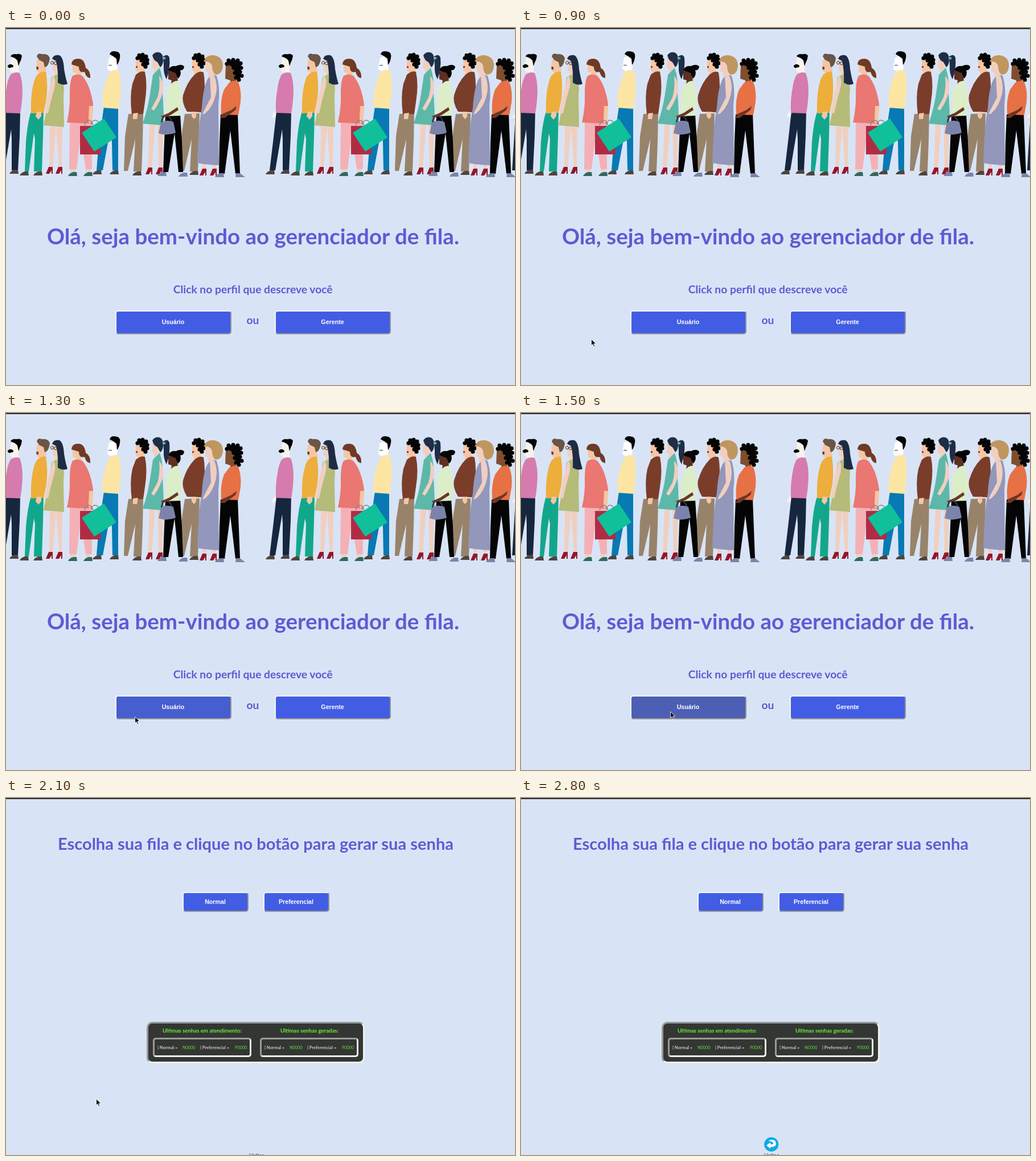
Animation of 894x627 px, one loop 8000 ms. Source, as an HTML page with a canvas:

```html
<!DOCTYPE html>
<html lang="pt">
<head>
<meta charset="utf-8">
<style>
html, body { margin: 0; width: 100%; height: 100%; overflow: hidden; background: #d8e4f6; }
#stage { position: relative; width: 894px; height: 627px; overflow: hidden; background: #d8e4f6; }
#bar { position: absolute; width: 894px; height: 2px; background: #2d2d2f; }
.page, .page > svg, canvas { position: absolute; left: 0; top: 0; width: 894px; height: 627px; }
[hidden] { display: none; }
.box { position: absolute; box-sizing: border-box; border: 2px solid; border-color: #f1f2f3 #949598 #949598 #f1f2f3;
  border-radius: 5px; background: #425de4; }
.sunk { background: #343634; border: 3.5px solid; border-color: #999b99 #eeefee #eeefee #999b99; border-radius: 10px; }
.inner { border-radius: 5px; }
text { font-family: Lato, "Noto Sans", sans-serif; font-weight: 700; fill: #6159d3; }
.mid { text-anchor: middle; }
.btn { font: 700 10.67px "Liberation Sans", Arial, sans-serif; fill: #fff; text-anchor: middle; }
.head { font-size: 9.6px; fill: #66ee34; text-anchor: middle; }
.label { font-size: 7.7px; fill: #c9cbc9; }
.code { font-size: 7.3px; font-weight: 400; fill: #5fdc32; }
.link { font-size: 9.7px; font-weight: 400; fill: #4b2aa0; text-anchor: middle; }
#cursor { position: absolute; left: 0; top: 0; overflow: visible; }
</style>
</head>
<body>
<div id="stage">
  <div class="page" id="welcome">
    <canvas id="crowd" width="894" height="627"></canvas>
    <div class="box" id="user" style="left:192px;top:496px;width:204px;height:42px"></div>
    <div class="box" style="left:472px;top:496px;width:204px;height:42px"></div>
    <svg viewBox="0 0 894 627">
      <text class="mid" x="434" y="380" font-size="38.5">Olá, seja bem-vindo ao gerenciador de fila.</text>
      <text class="mid" x="433.7" y="465.5" font-size="19.25">Click no perfil que descreve você</text>
      <text class="mid" x="433.5" y="519.5" font-size="19.25">ou</text>
      <text class="btn" x="293.5" y="519.5">Usuário</text>
      <text class="btn" x="573.5" y="519.5">Gerente</text>
    </svg>
  </div>
  <div class="page" id="queue" hidden>
    <div class="box" style="left:310px;top:165px;width:116px;height:35px"></div>
    <div class="box" style="left:452px;top:165px;width:116px;height:35px"></div>
    <div class="box sunk" style="left:247px;top:393px;width:383px;height:73px"></div>
    <div class="box sunk inner" style="left:258px;top:421px;width:173px;height:34px"></div>
    <div class="box sunk inner" style="left:446px;top:421px;width:173px;height:34px"></div>
    <svg viewBox="0 0 894 627">
      <text class="mid" x="438.5" y="91" font-size="29.05">Escolha sua fila e clique no botão para gerar sua senha</text>
      <text class="btn" x="367.5" y="185.5">Normal</text>
      <text class="btn" x="509.5" y="185.5">Preferencial</text>
      <text class="head" x="344.5" y="411.7">Ultimas senhas em atendimento:</text>
      <text class="head" x="533" y="411.7">Ultimas senhas geradas:</text>
      <g id="counters">
        <text class="label" x="266" y="441">| Normal =</text>
        <text class="code" x="310" y="441">N0000</text>
        <text class="label" x="341" y="441">| Preferencial =</text>
        <text class="code" x="402" y="441">P0000</text>
      </g>
      <use href="#counters" x="188"/>
      <text class="link" x="440" y="630.8">Voltar</text>
      <g id="back">
        <circle cx="439.7" cy="608.3" r="12.6" fill="#12a9e3"/>
        <path d="M434 602Q447 597 448 607Q448 613 438 613V616L431 610L438 605V608Q443 609 443 606Q442 603 434 602Z" fill="#fff"/>
      </g>
    </svg>
  </div>
  <div id="bar"></div>
  <svg id="cursor" width="10" height="15" hidden>
    <path d="M0.5 0.5V11.6L3 9.4L4.9 13.4L6.7 12.6L4.9 8.7L8.6 8.4Z" fill="#111" stroke="#fff" stroke-width=".8"/>
  </svg>
</div>
<script>
const $ = id => document.getElementById(id);
const ctx = $('crowd').getContext('2d');

const skin = '#f4c6a5', pale = '#f0cfc0', cream = '#f7f3ec', navy = '#16263f', black = '#050505';
const brown = '#7a3d2a', tan = '#98836a', slate = '#7c83ab', dark = '#6b3626', sole = '#4f443e';

function fill(color, d) {
  ctx.fillStyle = color;
  ctx.fill(new Path2D(d));
}
function line(color, width, d) {
  ctx.strokeStyle = color;
  ctx.lineWidth = width;
  ctx.stroke(new Path2D(d));
}
function at(dx, draw) {
  ctx.save();
  ctx.translate(dx, 0);
  draw();
  ctx.restore();
}
// Solid hair with a wavy outline
function curls(r, ...points) {
  ctx.fillStyle = ctx.strokeStyle = black;
  ctx.lineJoin = ctx.lineCap = 'round';
  const hair = new Path2D();
  points.forEach(([x, y]) => hair.lineTo(x, y));
  ctx.fill(hair);
  for (const [x, y] of points) {
    ctx.beginPath();
    ctx.arc(x, y, r, 0, 7);
    ctx.fill();
  }
}
const shoe = (color, x, y) => fill(color, `M${x} ${y}q2-5 9-7h6l1 7z`);
const boots = (y, ...xs) => xs.forEach(x => fill('#96152a', `M${x} ${y}l5-12h7v12h-2v-6l-4 6z`));

function shortCurls() {
  fill(skin, 'M228 57L242 54L243 70L244 78L231 83L232 77L228 75Z');
  curls(3.6, [231, 53], [234, 48], [240, 47], [246, 50], [248, 56], [248, 62], [245, 68], [241, 64], [238, 57]);
  fill('#b22b2b', 'M228 67h3v3h-3z');
}
function tanTrousers() {
  fill(tan, 'M215 151L241 150L240 200L238 252L224 252L227 195L214 251L207 251L209 190Z');
}

const people = [
  function mustacheMan() {
    fill(cream, 'M9 53L20 51L24 58L22 74L24 80L14 84L14 78Q7 78 6 70Z');
    fill(black, 'M8 50Q10 45 18 46Q26 44 28 49Q27 56 24 61L22 67L20 57Q16 52 8 50Z');
    fill(black, 'M3 66Q8 61 13 66Q13 70 9 69Q6 72 3 68Z');
    fill(cream, 'M-3 145L4 145L-1 154L-8 158L-8 152Z');
    fill(navy, 'M-1 147L25 147L24 190L21 250L10 250L10 195L9 178L-3 250L-13 250L-7 200Z');
    fill('#d67bae', 'M8 82Q16 76 24 79Q29 92 29 112Q28 135 25 150L-2 149Q-3 125 1 105Q3 90 8 82Z');
    shoe(sole, -20, 257);
    shoe(sole, 6, 256);
  },
  function amberMan() {
    fill(skin, 'M54 56L68 53L70 68L71 80L57 84L58 77Q53 77 53 71Z');
    fill('#6a5546', 'M54 50Q56 43 63 46Q74 44 77 53Q76 62 72 67L68 69L66 60L58 56Z');
    fill(brown, 'M53 68H57V73H54Z');
    fill('#12a78c', 'M44 147L66 146L65 190L63 252L49 252L51 195L49 185L40 252L33 252L35 200Q38 165 44 147Z');
    fill('#eeae3b', 'M55 82Q63 75 70 77Q74 100 71 125L66 149L44 150Q43 115 49 95Q51 86 55 82Z');
    fill(skin, 'M54 147L62 147L62 155L57 161L52 155Z');
    shoe(sole, 24, 259);
    shoe(sole, 48, 259);
  },
  function oliveWoman() {
    fill(pale, 'M77 172L88 174L82 246L76 246ZM88 174L99 174L98 246L93 246Z');
    fill(pale, 'M81 54L91 52L94 66L96 82L86 85L86 77L82 75Z');
    fill('#b5bb78', 'M80 86L96 79Q104 95 101 120L102 174L66 171Q72 140 76 115Z');
    fill('#1d2b44', 'M81 54Q84 46 94 48Q101 52 102 72Q105 90 108 98Q100 102 91 96Q92 74 88 58Z');
    fill(pale, 'M82 84Q89 88 85 106L79 128L74 150L68 149L72 126L77 104Z');
    line('#333', 1, 'M83.5 61a2.5 2.5 0 1 1-5 0a2.5 2.5 0 1 1 5 0M89.5 62a2.5 2.5 0 1 1-5 0a2.5 2.5 0 1 1 5 0');
    boots(256, 70, 87);
  },
  function yellowMan() {
    fill('#fff', 'M181 52L193 48L196 62L195 76L184 81L184 75Q178 75 178 69Z');
    fill(black, 'M182 46Q184 40 192 41Q202 42 200 52Q199 60 195 65L194 54Q188 49 182 46Z');
    line('#333', 1, 'M180 66l3-1l3 1');
    fill('#0879b2', 'M172 138L197 138L197 250L187 250L186 200L183 180L170 250L159 250L163 200Z');
    fill('#fde6a4', 'M182 78Q190 71 198 75Q203 90 201 115L198 142L170 140Q168 115 175 95Z');
    shoe(sole, 152, 257);
    shoe(sole, 182, 257);
  },
  function coralWoman() {
    fill(skin, 'M117 62L130 60L133 80L130 86L122 86L123 79L117 77Z');
    fill('#6f3a26', 'M115 64Q116 53 127 54Q138 54 140 70Q149 75 148 88Q141 88 138 77Q128 80 128 68Q122 66 115 64Z');
    fill(pale, 'M113 247h9v8h-9zM140 247h8v8h-8z');
    fill('#f3b1b6', 'M112 166L150 166L151 248L140 248L131 190L124 248L111 248Z');
    fill('#ea7771', 'M117 84Q126 79 134 84Q148 100 153 134L150 168L107 166Q113 140 112 115Q112 92 117 84Z');
    fill('#b02c45', 'M130 172H166V222H130Z');
    fill(skin, 'M146 137L153 137L152 160L146 169L145 160Z');
    line('#8a8a8a', 1.5, 'M138 173Q139 162 146 162Q152 163 153 173M150 170Q152 159 160 163L164 167');
    fill('#10c09a', 'M133 184L172 159L194 192L155 217Z');
    shoe('#2e6a62', 109, 260);
    shoe('#2e6a62', 136, 260);
  },
  function slimSweaterMan() {
    shortCurls();
    tanTrousers();
    fill(brown, 'M228 82Q237 74 244 77Q249 100 244 130L241 151L221 152Q217 120 222 98Z');
    fill(skin, 'M223 150L232 149L230 160L223 160Z');
    shoe(sole, 222, 259);
  },
  function tealWoman() {
    fill(pale, 'M252 169L262 169L256 246L249 246ZM266 169L276 169L274 246L268 246Z');
    fill(pale, 'M257 52L266 50L269 72L260 82L260 72L256 69Z');
    fill('#5cb8a8', 'M258 82L270 70Q277 90 275 115Q277 140 277 171L240 168Q248 145 252 122Z');
    fill('#1f2d47', 'M257 48Q262 41 270 43Q277 46 276 58Q275 66 271 69L266 60Q259 57 257 48ZM276 50Q284 44 287 52Q289 70 282 90Q276 80 277 66Z');
    fill('#5cb8a8', 'M275 51h5v4h-5z');
    fill(pale, 'M269 84Q277 92 276 110Q272 128 260 145L255 142L266 122Q271 106 269 84Z');
    boots(257, 245, 263);
  },
  function wideSweaterMan() {
    at(99, () => {
      shortCurls();
      tanTrousers();
    });
    fill(brown, 'M331 82Q340 74 347 78Q351 100 347 128L344 148L318 147Q308 130 311 118Q318 95 331 82Z');
    fill(skin, 'M326 147h8v9l-4 4l-4-5z');
    shoe(sole, 322, 258);
  },
  function bagWoman() {
    fill('#5e2f22', 'M285 74L298 74L301 86L302 95L290 99L291 92L285 90Z');
    fill(black, 'M285 74Q289 65 298 67Q309 62 313 68Q312 75 306 74Q309 83 302 89L298 79Z');
    fill(black, 'M280 153L306 152L309 200L311 253L303 253L296 185L285 253L276 253L278 200Z');
    fill('#dbeec8', 'M288 100Q296 91 303 93Q310 110 309 135L306 154L281 155Q279 125 283 108Z');
    line('#2f3245', 2.5, 'M273 168Q274 154 282 154Q290 156 292 168');
    fill(slate, 'M272 166Q282 160 294 165L298 184Q283 190 268 185Z');
    fill(dark, 'M301 139L303 144L289 153L275 158L272 155L286 149Z');
    shoe(slate, 266, 260);
    shoe(slate, 303, 261);
  },
  function blondeWoman() {
    fill(pale, 'M345 236h6v12h-6zM363 238h6v10h-6z');
    fill(pale, 'M350 56L362 56L366 78L362 88L355 88L355 78L350 76Z');
    fill('#c0965f', 'M347 59Q352 46 366 48Q381 51 381 66Q380 82 368 82Q362 78 362 66Q358 57 347 59Z');
    fill('#9297bb', 'M354 90Q362 80 370 84Q377 105 373 135L374 241Q350 240 336 237Q338 170 344 140Q346 105 354 90Z');
    fill(pale, 'M358 82L366 84Q372 100 369 115Q364 138 350 150L345 152L348 145L360 122Z');
    boots(259, 340, 358);
  },
  function orangeMan() {
    fill('#7f4e2e', 'M386 66L400 64L405 92L394 98L394 92L385 89Z');
    curls(3.6, [388, 63], [391, 57], [399, 56], [407, 57], [412, 62], [413, 70], [411, 77], [414, 84], [409, 91], [404, 87], [402, 79], [400, 70]);
    fill(black, 'M377 152L407 151L411 256L403 256L394 180L384 256L374 256L375 200Z');
    fill('#e87045', 'M392 96Q402 90 408 95Q414 110 412 130L408 153L378 152Q376 125 383 108Z');
    fill(dark, 'M405 137L403 144L384 158L376 158L380 151L396 144Z');
    shoe(slate, 367, 262);
    fill(slate, 'M403 262L404 255H411L420 262Z');
  }
];

for (const offset of [0, 476]) at(offset, () => people.forEach(draw => draw()));
fill(cream, 'M888 158L894 150V157Z');
fill(navy, 'M894 168V250H889Z');

// Cursor tip, held from each time until the next
const moves = [
  [500, 28, 559], [700, 87, 547], [900, 123, 546], [1000, 158, 544], [1100, 187, 541],
  [1200, 209, 537], [1300, 226, 533], [1400, 243, 529], [1500, 262, 524], [1600, 282, 518],
  [1700, 296, 514], [1800, 250, 519], [2100, 158, 528]
];
const idle = [66, 93, 228], hover = [77, 95, 174];

function render(t) {
  const step = Math.floor(t / 100) * 100;
  const second = step >= 2100;
  $('welcome').hidden = second;
  $('queue').hidden = !second;
  $('back').style.display = step >= 2800 ? '' : 'none';

  const p = Math.min(1, Math.max(0, (step - 1200) / 400));
  const k = 1 - (1 - p) ** 1.6;
  $('user').style.background = `rgb(${idle.map((c, i) => Math.round(c + (hover[i] - c) * k))})`;

  const move = step < 2200 && moves.filter(m => m[0] <= step).pop();
  $('cursor').style.display = move ? 'block' : 'none';
  if (move) $('cursor').style.transform = `translate(${move[1]}px, ${move[2]}px)`;
}

const start = performance.now();
function tick() {
  render((performance.now() - start) % 8000);
  requestAnimationFrame(tick);
}
tick();
</script>
</body>
</html>
```
